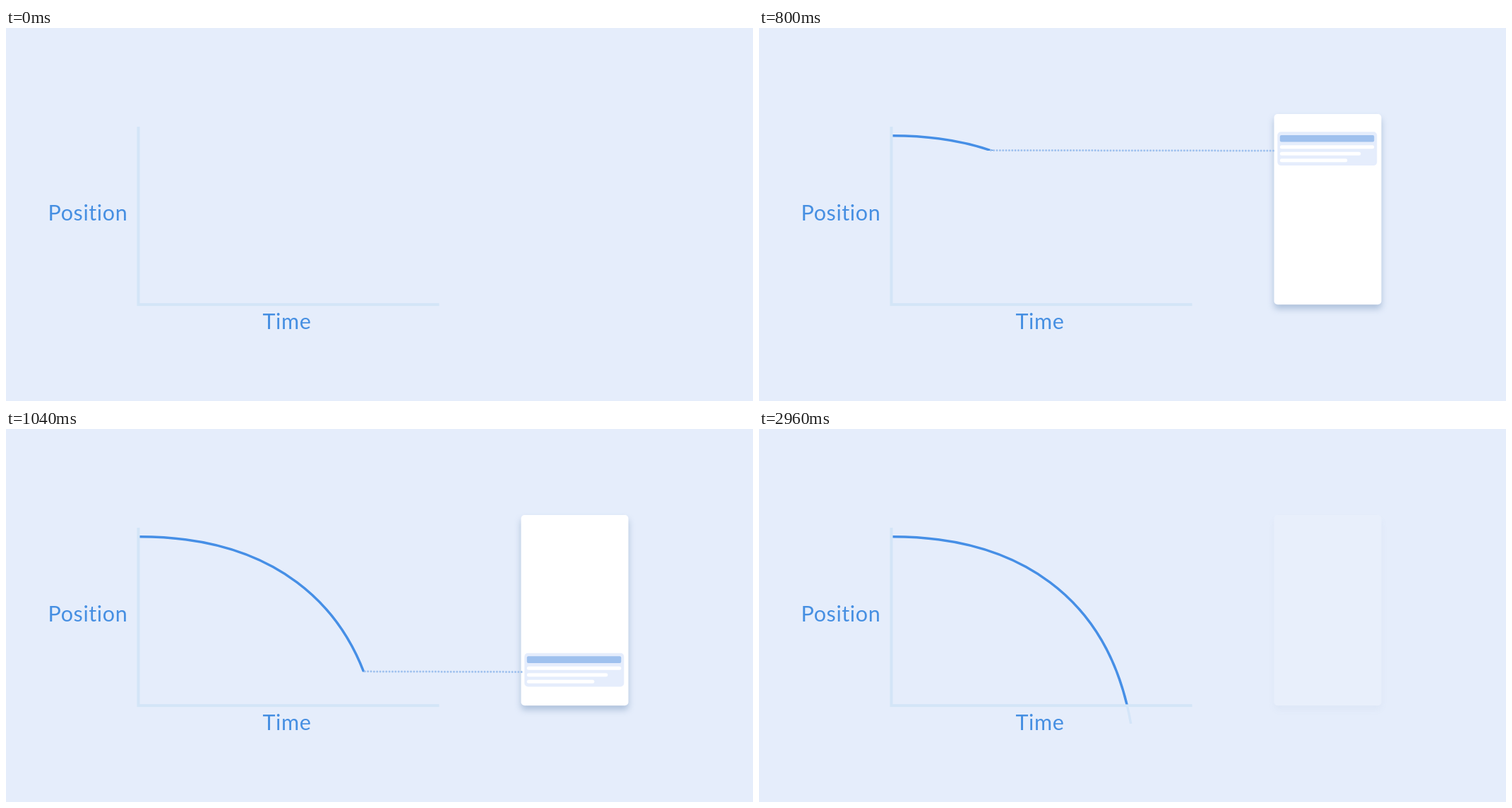
An HTML page for the animation above (3 s loop, 1058x529 px).

```html
<!DOCTYPE html>
<html lang="en">
<head>
<meta charset="utf-8">
<title>Position over time</title>
<style>
  html, body { margin: 0; width: 100%; height: 100%; overflow: hidden; background: #e5edfb; }
  svg { display: block; width: 100%; height: 100%; }
  text { font: 30.5px Lato, Roboto, sans-serif; letter-spacing: .6px; fill: #468fe2; }
  .phone { fill: #fff; filter: drop-shadow(0 6px 5px rgba(95, 132, 175, .42)); }
  .curve { fill: none; stroke-width: 3.5; }
</style>
</head>
<body>
<svg viewBox="0 0 1058 529">
  <defs>
    <path id="curve"/>
    <clipPath id="reveal"><rect id="revealBox" x="189" y="140" width="360" height="0"/></clipPath>
    <clipPath id="tailReveal"><rect id="tailBox" x="500" y="392" width="50" height="0"/></clipPath>
    <clipPath id="screen"><rect x="729.5" y="122" width="152" height="270.3" rx="5"/></clipPath>
  </defs>

  <use href="#curve" class="curve" stroke="#d4e5f8" clip-path="url(#tailReveal)"/>
  <path d="M187.5 140V392.3H613.5" fill="none" stroke="#d3e5f7" stroke-width="4"/>
  <use href="#curve" class="curve" stroke="#468fe6" clip-path="url(#reveal)"/>
  <text x="59.6" y="272.5">Position</text>
  <text x="363.6" y="427.3">Time</text>

  <g id="device">
    <rect class="phone" x="729.5" y="122" width="152" height="270.3" rx="5"/>
    <g clip-path="url(#screen)">
      <g id="card" fill="#fff">
        <rect x="734.3" width="141" height="47.8" rx="5" fill="#e5edfc"/>
        <rect x="737.8" y="4.6" width="133.5" height="9.6" rx="2" fill="#9fc1ee"/>
        <rect x="737.8" y="19" width="133.5" height="5" rx="2.5"/>
        <rect x="737.8" y="28.4" width="114.5" height="5" rx="2.5"/>
        <rect x="737.8" y="38" width="95.5" height="5" rx="2.5"/>
      </g>
    </g>
    <path id="dots" fill="none" stroke="#9fc1ee" stroke-width="3" stroke-linecap="round" stroke-dasharray="0 4.35"/>
  </g>
</svg>
<script>
const $ = id => document.getElementById(id);
const LOOP = 3000, STEP = 40, TOP = 152.8, END = 418;
const xs = [189.5, 365, 495, 526.7], ys = [TOP, TOP, 236.5, END];

const points = xs.map((x, i) => `${x} ${ys[i]}`);
$('curve').setAttribute('d', `M${points[0]}C${points.slice(1).join(' ')}`);

function bezier([a, b, c, d], s) {
  const r = 1 - s;
  return a * r ** 3 + 3 * b * r * r * s + 3 * c * r * s * s + d * s ** 3;
}

// x of the curve at a given height, found by bisection
function curveX(y) {
  let lo = 0, hi = 1;
  for (let i = 0; i < 20; i++) {
    const mid = (lo + hi) / 2;
    if (bezier(ys, mid) < y) lo = mid; else hi = mid;
  }
  return bezier(xs, lo);
}

function opacity(t) {
  if (t < 2840) return Math.max(0, Math.min(1, (t - 40) / 240));
  return t < 2960 ? .55 : .15;
}

function draw(now) {
  const t = Math.floor(now % LOOP / STEP) * STEP;
  const moving = t > 700;
  const y = TOP + 116.9 * (Math.max(0, t - 700) / 260) ** 1.827;
  const done = y >= END;

  $('revealBox').setAttribute('height', moving ? Math.min(y + .8, 390.6) - 140 : 0);
  $('tailBox').setAttribute('height', Math.max(0, Math.min(y, 420) - 392));
  $('device').setAttribute('opacity', opacity(t));
  $('card').setAttribute('transform', `translate(0 ${y - 25.9})`);
  $('card').style.display = $('dots').style.display = done ? 'none' : '';
  if (!done) $('dots').setAttribute('d', `M${moving ? curveX(y) + 2 : 191} ${y + .2}L732 ${y + .8}`);
  requestAnimationFrame(draw);
}
requestAnimationFrame(draw);
</script>
</body>
</html>
```
